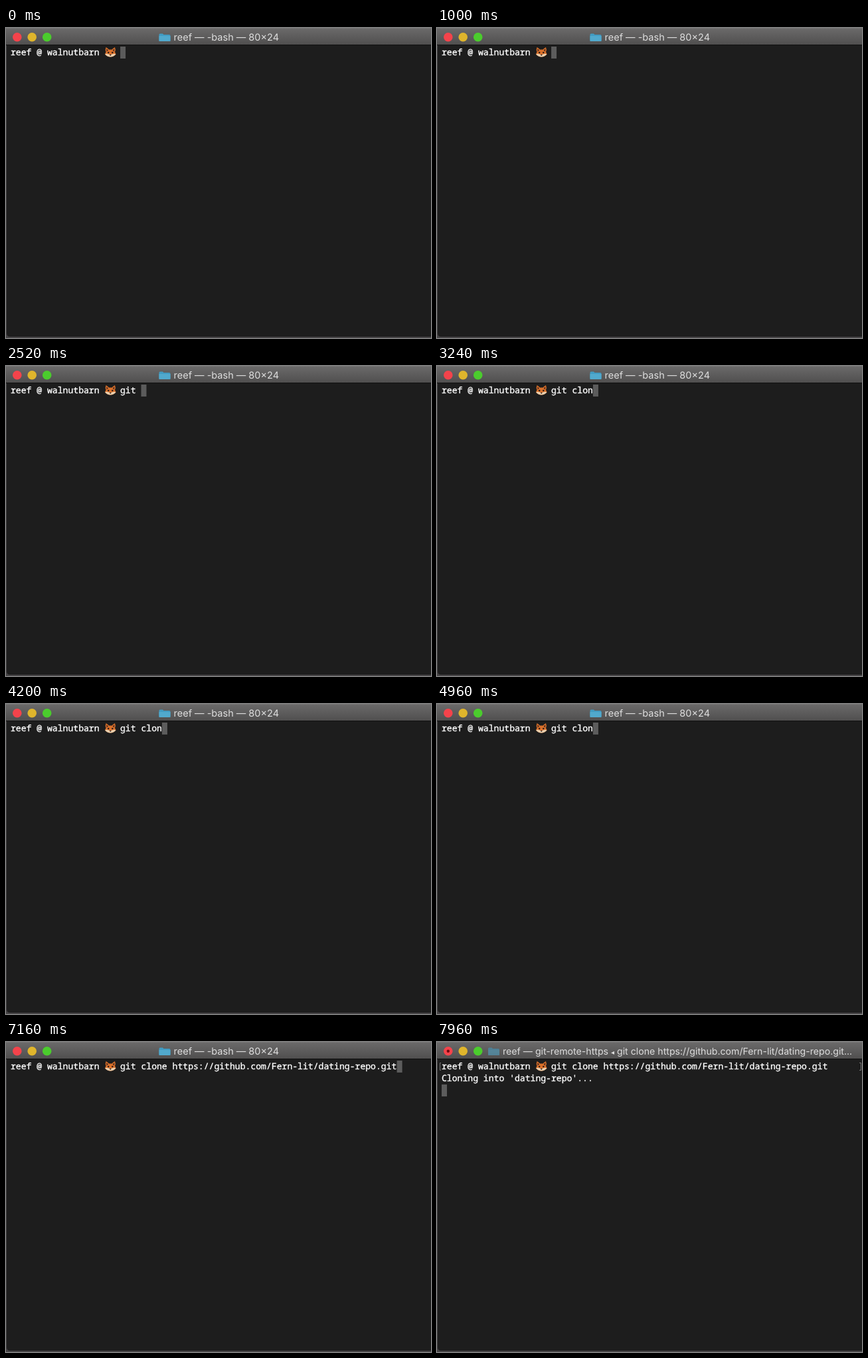
Recreate the animation shown at these times as an HTML page. Size 640 by 467 pixels, loop 8 s.

```html
<!DOCTYPE html>
<html lang="en">
<head>
<meta charset="utf-8">
<title>Terminal</title>
<style>
  html, body { margin: 0; width: 100%; height: 100%; overflow: hidden; background: #454345; }
  svg { display: block; width: 640px; height: 467px; }
  text { white-space: pre; text-rendering: geometricPrecision; }
  .title { font-family: Inter, "DejaVu Sans", sans-serif; fill: #dedede; }
  .mono {
    font: 500 13.1px "Noto Sans Mono", "DejaVu Sans Mono", monospace;
    fill: #fff; stroke: #fff; stroke-width: .35px;
  }
</style>
</head>
<body>
<svg viewBox="0 0 640 467">
  <defs>
    <linearGradient id="bar" x2="0" y2="1">
      <stop offset="0" stop-color="#6b6a6a"/>
      <stop offset="1" stop-color="#504f4f"/>
    </linearGradient>
  </defs>

  <path d="M1 24H640V465H6Q1 465 1 460Z" fill="#1d1d1d"/>
  <rect width="640" height="25" fill="url(#bar)"/>
  <path d="M0 .5H640" stroke="#777676"/>
  <path d="M0 25.5H640" stroke="#101010"/>

  <circle cx="16.800" cy="13.800" r="6.800" fill="#f4434b"/>
  <circle id="busyDot" cx="16.800" cy="13.800" r="2.200" fill="#6d0910"/>
  <circle cx="39.200" cy="13.800" r="6.800" fill="#dfb52c"/>
  <circle cx="61.700" cy="13.800" r="6.800" fill="#4bcc2d"/>

  <g id="folder">
    <path d="M0 2Q0 .5 1.500 .5H5.500L7 2H15.500Q17 2 17 3.500V11Q17 12 16 12H1Q0 12 0 11Z" fill="#419bc2"/>
    <path d="M0 4H17V11Q17 12 16 12H1Q0 12 0 11Z" fill="#51a9cd"/>
  </g>
  <text id="idleTitle" class="title" x="252.500" y="19" font-size="14.500">reef — -bash — 80×24</text>
  <text id="busyTitle" class="title" x="99" y="19" font-size="14.150">reef — git-remote-https <tspan font-size="10">◂</tspan> git clone <tspan id="titleUrl"></tspan>...</text>

  <path id="brackets" d="M6 31.500H4.500V42.500H6M636 31.500H638.500V42.500H636" fill="none" stroke="#777"/>
  <rect id="cursor" width="8" height="18" fill="#5c5c5c"/>
  <text class="mono" x="7" y="41">reef @ walnutbarn</text>

  <g transform="translate(149 29)">
    <path d="M1.500 0Q4 1 6 3.500H10.500Q12.500 1 15 0Q16.500 3.500 15 7L16.500 10.500Q13 14.500 8.200 14.500Q3.500 14.500 0 10.500L1.500 7Q0 3.500 1.500 0Z" fill="#d9702a"/>
    <path d="M2.200 2L5 4.500L2.500 6.500ZM14.300 2L11.500 4.500L14 6.500Z" fill="#4d2c20"/>
    <path d="M0 10.500Q3 9 5.500 10.500L8.200 11L11 10.500Q13.500 9 16.500 10.500Q13 14.500 8.200 14.500Q3.500 14.500 0 10.500Z" fill="#e9cfae"/>
    <circle cx="5.200" cy="8" r="1.200" fill="#271a18"/>
    <circle cx="11.300" cy="8" r="1.200" fill="#271a18"/>
    <path d="M6.700 11H9.800L8.200 13Z" fill="#271a18"/>
  </g>

  <text id="command" class="mono" x="172" y="41"></text>
  <text id="output" class="mono" x="7" y="59">Cloning into 'dating-repo'...</text>
</svg>
<script>
const LOOP = 8000, LEFT = 7, ADVANCE = 7.86, PROMPT_COLUMNS = 21;
const PASTE = 7000, ENTER = 7480, RUNNING = 7640;
const KEY_TIMES = [1320, 1440, 1560, 1720, 2600, 2760, 2880, 3000, 5240, 5400];
const REPO_URL = "https://github.com/Fern-lit/dating-repo.git";
const COMMAND = "git clone " + REPO_URL;

const el = id => document.getElementById(id);
const show = (id, visible) => el(id).setAttribute("visibility", visible ? "visible" : "hidden");

function place(id, attributes) {
  for (const name in attributes) el(id).setAttribute(name, attributes[name]);
}

function draw(t) {
  const typed = t >= PASTE ? COMMAND.length : KEY_TIMES.filter(time => time <= t).length;
  const entered = t >= ENTER, running = t >= RUNNING;

  el("command").textContent = COMMAND.slice(0, typed);
  show("idleTitle", !running);
  for (const id of ["busyTitle", "busyDot", "output"]) show(id, running);
  show("brackets", entered);

  place("folder", {
    transform: `translate(${running ? 77 : 230.5} 8)`,
    opacity: running ? 0.55 : 1
  });
  place("cursor", {
    x: entered ? LEFT : LEFT + (PROMPT_COLUMNS + typed) * ADVANCE,
    y: running ? 64 : entered ? 46 : 28
  });
}

function frame() {
  draw(performance.now() % LOOP);
  requestAnimationFrame(frame);
}

el("titleUrl").textContent = REPO_URL;
frame();
</script>
</body>
</html>
```
